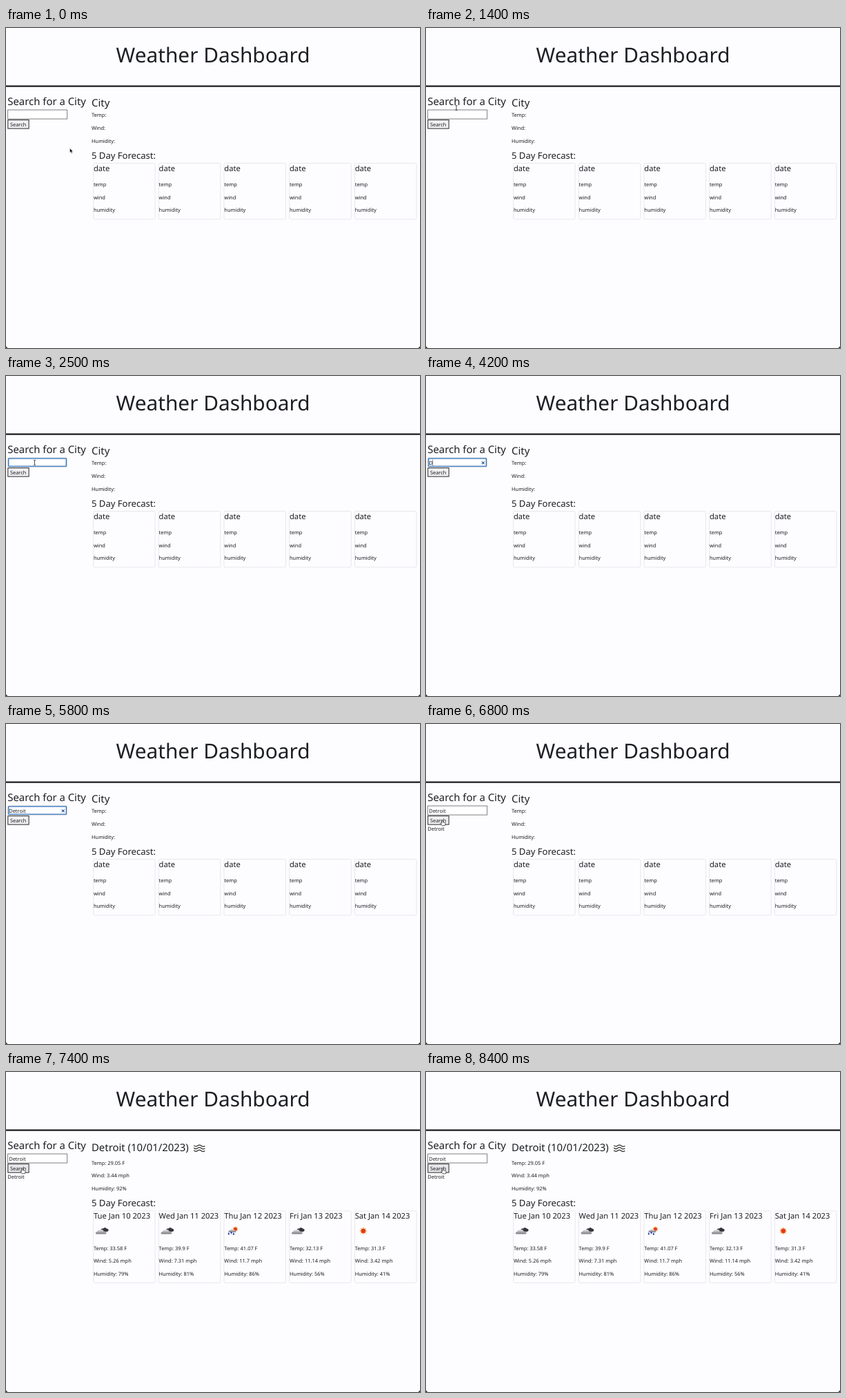
An HTML page for the animation above (8.6 s loop, 600 by 465 pixels).

```html
<!DOCTYPE html>
<html lang="en">
<head>
<meta charset="utf-8">
<title>Weather Dashboard</title>
<style>
  html, body { margin: 0; width: 100%; height: 100%; overflow: hidden; background: #fdfcfe; }
  svg { display: block; width: 600px; height: 465px; }
  text {
    font-family: "Noto Sans", "Open Sans", sans-serif;
    text-rendering: geometricPrecision;
    fill: #1c1f23;
    white-space: pre;
  }
</style>
</head>
<body>
<svg id="stage" viewBox="0 0 600 465"></svg>
<script>
const LOOP = 8600, STEP = 100;
const BODY = 7.46, H4 = 11.18, H3 = 13.05, H2 = 14.9, H1 = 29.8;
const LINE = 18.64, CARD_GAP = 94.7;
const stage = document.getElementById('stage');

const days = [
  ['Tue Jan 10 2023', '33.58', '5.26', 79, cloud],
  ['Wed Jan 11 2023', '39.9', '7.31', 81, cloud],
  ['Thu Jan 12 2023', '41.07', '11.7', 86, rain],
  ['Fri Jan 13 2023', '32.13', '11.14', 56, cloud],
  ['Sat Jan 14 2023', '31.3', '3.42', 41, p => sun(p, 0, 0, 5.6)]
];

// Moments at which each letter of the city is typed
const keys = [4200, 4400, 4500, 4600, 4900, 5100, 5300];
const caretEnds = [5, 9.7, 13.8, 16.4, 19.5, 24.1, 26, 28.8];

// Pointer path: time, x, y
const path = [
  [900, 92.5, 174.8], [1400, 44, 116], [1600, 42.5, 114], [1800, 43, 125],
  [2300, 43, 125], [2500, 41.5, 125.8], [5900, 41.5, 125.8], [6600, 23.6, 139.6],
  [7800, 23.6, 139.6], [8100, 24.2, 139.6], [8400, 24.6, 139.8]
];

function text(x, y, size, str, extra = '') {
  return `<text x="${x}" y="${y}" font-size="${size}" ${extra}>${str}</text>`;
}

function lines(x, y, list) {
  return list.map((s, i) => text(x, y + i * LINE, BODY, s)).join('');
}

function box(x, y, w, h, stroke, width, fill = 'none', r = 0) {
  return `<rect x="${x}" y="${y}" width="${w}" height="${h}" rx="${r}" fill="${fill}" stroke="${stroke}" stroke-width="${width}"/>`;
}

function shape(d, fill, extra = '') {
  return `<path d="${d}" fill="${fill}" ${extra}/>`;
}

function at(x, y, content) {
  return `<g transform="translate(${x} ${y})">${content}</g>`;
}

function sunShape(x, y, r) {
  let d = '';
  for (let i = 0; i < 16; i++) {
    const a = i * Math.PI / 8, k = i % 2 ? r * 0.6 : r;
    d += `${i ? 'L' : 'M'}${(x + k * Math.cos(a)).toFixed(2)} ${(y + k * Math.sin(a)).toFixed(2)}`;
  }
  return shape(d + 'Z', '#f3a04c') + `<circle cx="${x}" cy="${y}" r="${r * 0.55}" fill="#e2391c"/>`;
}

function sun(p, x, y, r) {
  return at(p.x, p.y, sunShape(x, y, r));
}

function cloud(p) {
  return at(p.x, p.y,
    shape('M-2-1Q-1-4 2-3.5Q4-6.5 7-3.5Q10-3 9.5-.5Q9 1 6 1H0Z', '#34343a') +
    shape('M-8.5 4.5Q-10.5 2-7 1Q-6-2.5-2.5-1.2Q1-3 2.8.5Q7.5.5 6.5 3.5Q6 4.6 4 4.6Z', 'url(#grey)'));
}

function rain(p) {
  const drop = (x, y) => shape(`M${x} ${y}q-2.3 3.4 0 3.6q2.3-.2 0-3.6Z`, '#2346a8');
  return at(p.x, p.y,
    sunShape(4, -2.6, 4.4) +
    shape('M-5.5 2Q-7-.4-4-.8Q-3-3.6 0-2.4Q3-2.4 3.2 0Q6 .6 4.5 2.2Z', 'url(#grey)') +
    drop(-5.6, 2) + drop(-1.8, 0.6) + drop(1.5, 2.4));
}

function mist(x, y) {
  let d = '';
  for (const dy of [-3.6, 0, 3.6])
    d += `M${x - 8} ${y + dy - 0.8}q2.7 2.8 5.4 .6t5.4 0t5.4 .2`;
  return shape(d, 'none', 'stroke="#333" stroke-width="1.25"');
}

function card(day, i, loaded) {
  const x = 126.6 + i * CARD_GAP, top = loaded ? 201.9 : 196.5;
  const frame = box(x, top, 89.5, loaded ? 104.4 : 81.4, '#dfe0e5', 0.7, 'none', 1.8);
  const [date, temp, wind, humidity, icon] = day;
  const tx = x + 0.3;
  if (!loaded)
    return frame + text(tx, 207.8, H4, 'date') + lines(tx, 230.1, ['temp', 'wind', 'humidity']);
  return frame + text(tx, 213.2, H4, date) + icon({ x: x + 12.4, y: 230.9 }) +
    lines(tx, 258.6, [`Temp: ${temp} F`, `Wind: ${wind} mph`, `Humidity: ${humidity}%`]);
}

function caretOn(t, typed) {
  if (t < 2000 || t >= 5800) return false;
  if (typed) return true;
  return t < 2500 || (t >= 3000 && t < 3500) || t >= 4000;
}

function searchField(t) {
  const typed = keys.filter(k => t >= k).length;
  const focused = t >= 2000 && t < 6800;
  let out = focused
    ? box(2.9, 119.1, 85.2, 12.9, '#a9a6a6', 0.7, '#fff', 1) +
      box(3.7, 119.9, 83.6, 11.3, '#2f73c4', 1.3, '#fff', 0.6)
    : box(2.6, 119, 86, 13.1, '#77777b', 0.93, '#fff');
  out += text(4.2, 128.5, BODY, 'Detroit'.slice(0, typed));
  if (focused && typed)
    out += shape('M80.8 124.4l3.8 3.8m0-3.8l-3.8 3.8', 'none', 'stroke="#23568f" stroke-width="1.2"');
  if (caretOn(t, typed))
    out += shape(`M${caretEnds[typed]} 121.6v8.6`, 'none', 'stroke="#222" stroke-width=".6"');
  return out;
}

function pointerAt(t) {
  let [, x, y] = path[0];
  for (let i = 1; i < path.length; i++) {
    const [t0, x0, y0] = path[i - 1], [t1, x1, y1] = path[i];
    if (t < t0) break;
    const k = Math.min(1, (t - t0) / (t1 - t0));
    x = x0 + (x1 - x0) * k;
    y = y0 + (y1 - y0) * k;
  }
  return [x, y];
}

function pointer(t) {
  if (t >= 4200 && t < 5900) return '';
  const [x, y] = pointerAt(t);
  if (y < 133)
    return at(x, y, shape('M-1.5-3.6Q0-3.6 0-2.7Q0-3.6 1.5-3.6M0-2.9V2.9M-1.5 3.6Q0 3.6 0 2.7Q0 3.6 1.5 3.6',
      'none', 'stroke="#222" stroke-width=".8"'));
  if (x > 34)
    return at(x, y, shape('M0 0V6.4L1.5 5L2.6 7.5L3.7 7L2.7 4.6H4.6Z', '#111', 'stroke="#fff" stroke-width=".4"'));
  return at(x, y, shape('M-.8 .5Q0-.5 .8 .5V3L3.7 3.7Q4.8 4 4.5 5.4L3.8 8H-.3L-2.8 4.8Q-2.8 3.7-1.7 4.2L-.8 5Z',
    '#fff', 'stroke="#222" stroke-width=".7"'));
}

function draw(t) {
  const found = t >= 7100, loaded = t >= 7400;
  const dy = loaded ? 5.4 : 0;
  const current = found
    ? ['Temp: 29.05 F', 'Wind: 3.44 mph', 'Humidity: 92%']
    : ['Temp:', 'Wind:', 'Humidity:'];
  return `<defs><linearGradient id="grey" x2="0" y2="1">
      <stop stop-color="#e9e9ec"/><stop offset="1" stop-color="#77777d"/></linearGradient></defs>` +
    text(300, 50.3, H1, 'Weather Dashboard', 'text-anchor="middle"') +
    '<rect y="83.5" width="600" height="2.1" fill="#0c0c0e"/>' +
    text(2.3, 111.7, H2, 'Search for a City') +
    searchField(t) +
    box(2.8, 133.6, 30.3, 12.5, '#29292b', 1, found ? '#e6e6e9' : '#efeff1') +
    text(5.9, 142.6, BODY, 'Search') +
    (t >= 6800 ? text(2.3, 155.2, BODY, 'Detroit') : '') +
    text(124, loaded ? 115 : 114, H2, found ? 'Detroit (10/01/2023)' : 'City') +
    (loaded ? mist(280.2, 111) : '') +
    lines(124, 129.4 + dy, current) +
    text(124, 189.7 + dy, H3, '5 Day Forecast:') +
    days.map((day, i) => card(day, i, loaded)).join('') +
    shape('M0 461.5Q.3 464.7 3.5 465H0ZM600 461.5Q599.7 464.7 596.5 465H600Z', '#111') +
    pointer(t);
}

let shown = -1;
function tick() {
  const t = Math.floor(performance.now() % LOOP / STEP) * STEP;
  if (t !== shown) stage.innerHTML = draw(shown = t);
  requestAnimationFrame(tick);
}
tick();
</script>
</body>
</html>
```
